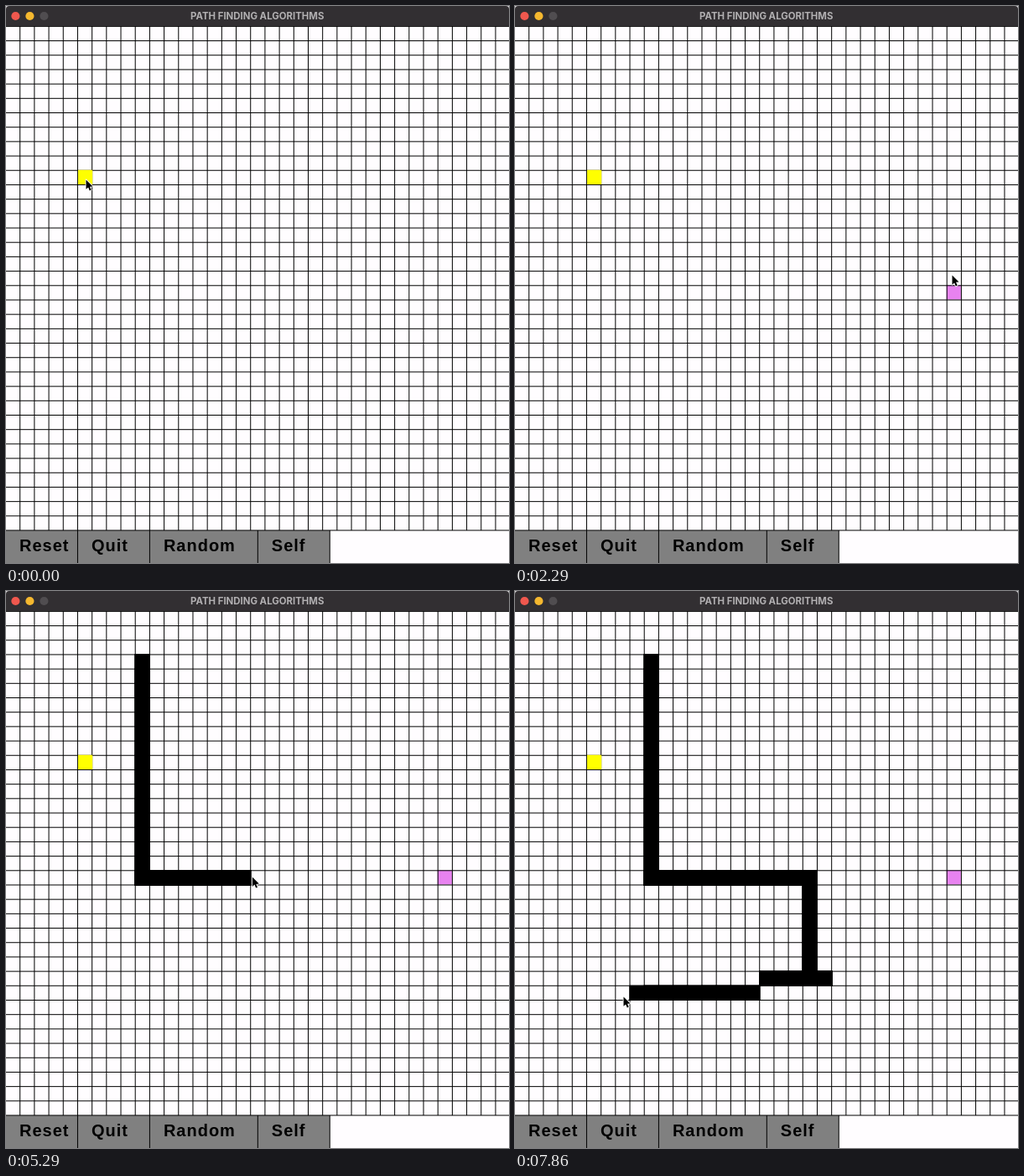
An HTML page with a canvas for the animation above (8000 ms loop, 600 px wide and 665 px high).

```html
<!DOCTYPE html>
<html lang="en">
<head>
<meta charset="utf-8">
<title>Path finding</title>
<style>
html, body { margin: 0; width: 100%; height: 100%; overflow: hidden; background: #fff; }
canvas { display: block; }
</style>
</head>
<body>
<canvas id="stage" width="600" height="665"></canvas>
<script>
const ctx = document.getElementById('stage').getContext('2d');
const LOOP = 8000, FPS = 7;
const CELL = 17.19, LEFT = -1, TOP = 23.86;
const DRAW_START = 20, LAG = 0.6;

// Pointer path: [tick, x, y] at each turn, straight in between
const PATH = [
  [0, 96, 207], [8, 523, 343], [15, 523, 343], [16, 522, 321],
  [19, 165, 82], [20, 165, 82], [22, 166, 125], [29, 166, 335],
  [30, 166, 335], [40.2, 353, 344], [41, 353, 344], [46.3, 359, 460],
  [47, 370, 460], [48, 370, 460], [50.4, 291.7, 471], [54.9, 130, 484], [56, 130, 484]
];

const lineX = k => LEFT + CELL * k;
const lineY = k => TOP + CELL * k;

function pointAt(tick) {
  const i = Math.max(1, PATH.findIndex(p => p[0] >= tick));
  const [t0, x0, y0] = PATH[i - 1], [t1, x1, y1] = PATH[i];
  const u = (tick - t0) / (t1 - t0);
  return [x0 + (x1 - x0) * u, y0 + (y1 - y0) * u];
}

function rect(color, x, y, w, h) {
  ctx.fillStyle = color;
  ctx.fillRect(x, y, w, h);
}

function text(str, x, y, font, color, align, spacing) {
  ctx.font = font;
  ctx.fillStyle = color;
  ctx.textAlign = align;
  ctx.letterSpacing = spacing + 'px';
  ctx.fillText(str, x, y);
}

function titleBar() {
  rect('#d8d6d8', 0, 0, 600, 6);
  ctx.fillStyle = '#322f32';
  ctx.beginPath();
  ctx.roundRect(0, 0, 600, 24, [4, 4, 0, 0]);
  ctx.fill();
  ['#f0584e', '#f5b82f', '#504d50'].forEach((color, i) => {
    ctx.fillStyle = color;
    ctx.beginPath();
    ctx.arc(11.4 + 17 * i, 12, 5.1, 0, Math.PI * 2);
    ctx.fill();
  });
  text('PATH FINDING ALGORITHMS', 299.7, 16, 'bold 11.4px Inter, sans-serif', '#b1afb1', 'center', 0);
}

function buttons() {
  const font = 'bold 20px "Liberation Sans", Arial, sans-serif';
  rect('#808080', 0, 626, 386, 39);
  rect('#000', 0, lineY(35), 600, 1);
  [['Reset', 0, 5], ['Quit', 5, 10], ['Random', 10, 17.5], ['Self', 17.5, 22.5]].forEach(([label, from, to]) => {
    rect('#000', lineX(to), 626, 1, 39);
    text(label, lineX(from) + 17, 651, font, '#000', 'left', 1);
  });
}

function grid() {
  for (let k = 1; k < 35; k++) rect('#000', lineX(k), 24, 1, 602);
  for (let k = 0; k < 35; k++) rect('#000', 0, lineY(k), 600, 1);
}

// Fill every cell the pointer has passed while drawing
function walls(tick) {
  for (let i = 0; DRAW_START + i / 10 <= tick - LAG; i++) {
    const [x, y] = pointAt(DRAW_START + i / 10);
    const c = Math.floor((x + 0.5) / CELL), r = Math.floor((y - TOP) / CELL);
    rect('#000', lineX(c), lineY(r), CELL + 1, CELL + 1);
  }
}

function pointer(x, y) {
  const shape = [[0, 0], [0, 11.3], [2.6, 9], [4.3, 13], [6.2, 12.2], [4.5, 8.3], [8, 8]];
  ctx.beginPath();
  for (const [dx, dy] of shape) ctx.lineTo(x - 0.5 + dx, y + 0.4 + dy);
  ctx.closePath();
  ctx.lineJoin = 'round';
  ctx.lineWidth = 1.6;
  ctx.strokeStyle = '#fff';
  ctx.stroke();
  ctx.fillStyle = '#000';
  ctx.fill();
}

function draw(ms) {
  const tick = Math.floor((ms % LOOP + 4) * FPS / 1000);
  rect('#fffdff', 0, 0, 600, 665);
  if (tick >= 9) rect('#e882f0', lineX(30), lineY(18), CELL, CELL);
  grid();
  rect('#ffff00', lineX(5) + 1, lineY(10), CELL, CELL);
  walls(tick);
  titleBar();
  buttons();
  pointer(...pointAt(tick));
}

const start = performance.now();
function frame() {
  draw(performance.now() - start);
  requestAnimationFrame(frame);
}
frame();
</script>
</body>
</html>
```
